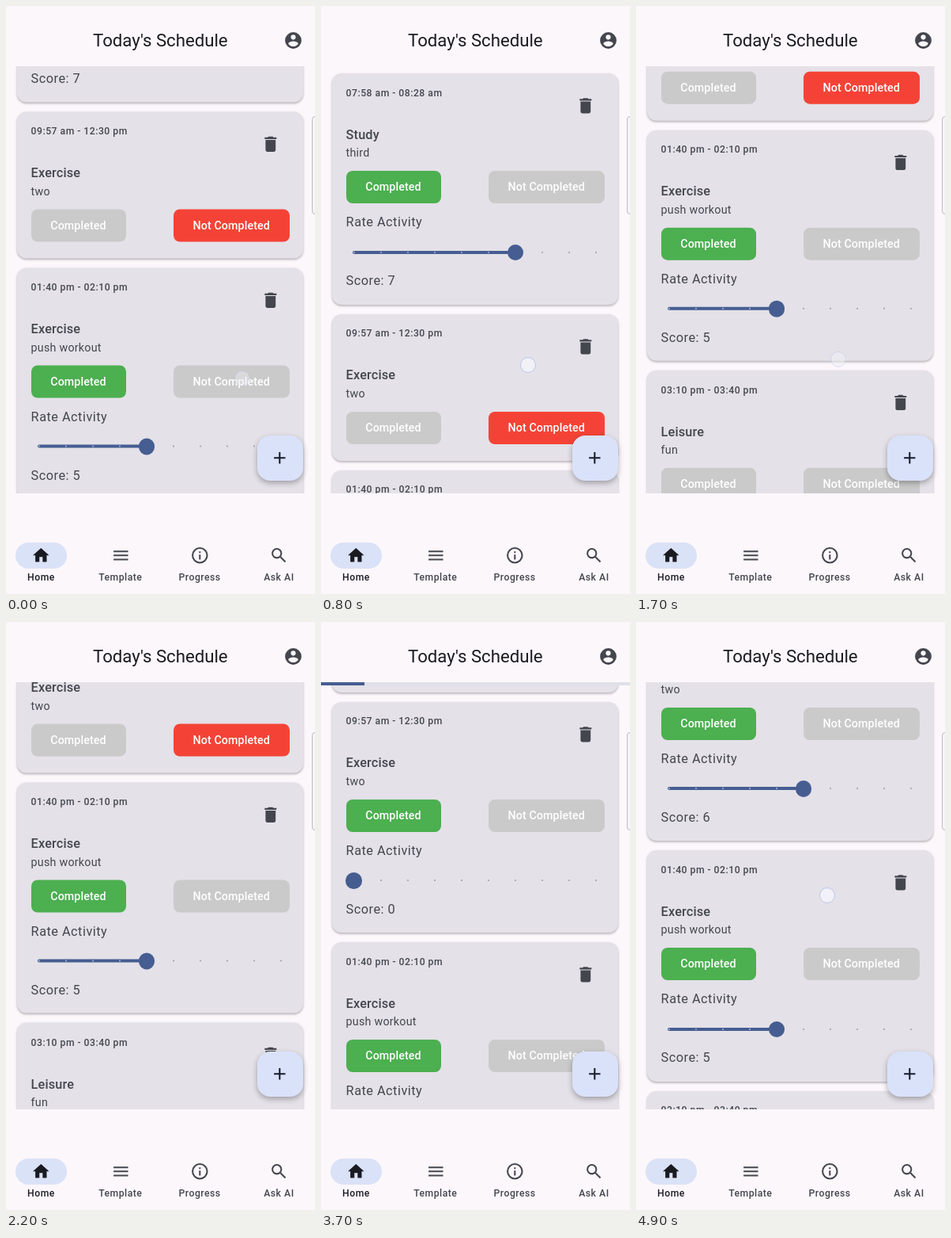
An HTML page for the animation above (5 s loop, 391x742 px).

```html
<!DOCTYPE html>
<html lang="en">
<head>
<meta charset="utf-8">
<title>Today's Schedule</title>
<style>
  html, body { margin: 0; width: 100%; height: 100%; overflow: hidden; background: #fcf7fb; }
  #app { position: relative; width: 391px; height: 742px; overflow: hidden; background: #fcf7fb;
    font-family: Roboto, "Noto Sans", sans-serif; color: #44464e; }
  #app div, #app svg { position: absolute; box-sizing: border-box; }
  .txt { white-space: nowrap; line-height: 20px; height: 20px; }
  .mid { transform: translateX(-50%); }
  .h1 { font-size: 22.2px; color: #1b1b20; }
  .time, .nav { font-size: 12.2px; font-weight: 500; letter-spacing: .5px; }
  .name { font-size: 16.3px; font-weight: 500; letter-spacing: .15px; }
  .note { font-size: 14.25px; letter-spacing: .25px; }
  .body { font-size: 16.3px; letter-spacing: .5px; }
  #list { left: 0; top: 76px; width: 391px; height: 538.5px; overflow: hidden; }
  #cards { left: 0; top: 9px; width: 391px; }
  .card { left: 14px; width: 362px; border-radius: 12px; background: #e4e1e8;
    box-shadow: 0 1.5px 3px rgba(0,0,0,.3); }
  .btn { top: 123px; height: 41px; border-radius: 8px; text-align: center; line-height: 41px;
    font-size: 14.25px; font-weight: 500; letter-spacing: .1px; white-space: nowrap; color: #fff; }
  .rate { left: 0; top: 0; }
  .bar { left: 25.5px; top: 223.9px; height: 4px; border-radius: 2px; background: #455d91; }
  .tick { top: 224.9px; width: 2px; height: 2px; border-radius: 1px; }
  .thumb { top: 215.6px; width: 20.6px; height: 20.6px; border-radius: 50%; background: #455d91; }
  #loader { left: 0; top: 76px; width: 391px; height: 4.2px; background: #e1e0e8; overflow: hidden; }
  #line { top: 0; height: 100%; background: #455d91; }
  #fab { left: 318px; top: 541.5px; width: 57.5px; height: 57.5px; border-radius: 16.3px;
    background: #dae2f9; box-shadow: 0 3px 7px rgba(0,0,0,.3); }
  #pill { left: 12px; top: 676.5px; width: 65px; height: 33px; border-radius: 17px; background: #dae2f7; }
  #edge { left: 387px; top: 138.5px; width: 12px; height: 124px; border-radius: 4px;
    border: 1px solid #bdbbc0; background: #f7f3f8; }
  #dot { left: -10px; top: -10px; width: 20px; height: 20px; border-radius: 50%;
    border: 1.5px solid #b9c7ee; background: #f1f1f7; }
</style>
</head>
<body>
<div id="app">
  <div id="list"><div id="cards"></div></div>
  <div id="loader"><div id="line"></div></div>
  <div id="fab"></div>
  <div id="pill"></div>
  <div id="edge"></div>
</div>
<script>
const $ = id => document.getElementById(id);
const app = $('app');

const stroke = d => `<path d="${d}" fill="none" stroke="currentColor" stroke-width="2"/>`;
const solid = d => `<path d="${d}" fill="currentColor"/>`;
const ring = (x, y, r) =>
  `<circle cx="${x}" cy="${y}" r="${r}" fill="none" stroke="currentColor" stroke-width="2"/>`;
const ICONS = {
  bin: solid('M6 7h12v12a2 2 0 0 1-2 2H8a2 2 0 0 1-2-2zM5 4h3.5l1-1h5l1 1H19v2H5z'),
  home: solid('M10 20v-6h4v6h5v-8h3L12 3 2 12h3v8z'),
  menu: stroke('M3 7h18M3 12h18M3 17h18'),
  info: ring(12, 12, 9) + stroke('M12 7v2M12 11v6'),
  find: ring(9.5, 9.5, 5.5) + stroke('M14 14l6 6'),
  plus: stroke('M12 5v14M5 12h14'),
  user: solid('M12 2a10 10 0 1 0 0 20a10 10 0 1 0 0-20zm0 3a3 3 0 1 1 0 6a3 3 0 1 1 0-6z' +
    'm0 14.2q-3.7 0-6-3.2c0-2 4-3.1 6-3.1s6 1.1 6 3.1q-2.3 3.2-6 3.2z')
};

function icon(parent, name, x, y, color = '#44464e', size = 24.6) {
  parent.insertAdjacentHTML('beforeend',
    `<svg viewBox="0 0 24 24" width="${size}" height="${size}"
      style="color:${color};left:${x - size / 2}px;top:${y - size / 2}px">${ICONS[name]}</svg>`);
}

function add(parent, cls, style = {}, text = '') {
  const el = document.createElement('div');
  el.className = cls;
  Object.assign(el.style, style);
  el.textContent = text;
  parent.append(el);
  return el;
}

// y is the vertical centre of the line
const label = (parent, cls, x, y, text) =>
  add(parent, 'txt ' + cls, { left: x + 'px', top: y - 10 + 'px' }, text);

const TALL = 291.5, SHORT = 185, GAP = 12, PAD = 17.6;
const tickX = i => 27.5 + 34.1 * i;
const scoreX = value => tickX(Math.max(value, 1) - 1);

function makeCard([time, name, note]) {
  const el = add($('cards'), 'card');
  label(el, 'time', PAD, 24.5, time);
  icon(el, 'bin', 320.3, 41, '#44464e', 25.6);
  label(el, 'name', PAD, 77.5, name);
  label(el, 'note', PAD, 100.3, note);
  const yes = add(el, 'btn', { left: '17.5px', width: '120px' }, 'Completed');
  const no = add(el, 'btn', { left: '198px', width: '146.5px' }, 'Not Completed');
  const rate = add(el, 'rate');
  label(rate, 'body', PAD, 188.3, 'Rate Activity');
  const bar = add(rate, 'bar');
  const ticks = Array.from({ length: 10 }, (_, i) =>
    add(rate, 'tick', { left: tickX(i) - 1 + 'px' }));
  const thumb = add(rate, 'thumb');
  const score = label(rate, 'body', PAD, 262.3, '');
  return { el, yes, no, rate, bar, ticks, thumb, score };
}

// Places a card and returns the top of the next one
function setCard(c, top, state, value) {
  const done = state === 'yes';
  const h = done ? TALL : SHORT;
  c.el.style.top = top + 'px';
  c.el.style.height = h + 'px';
  c.yes.style.background = done ? '#4caf50' : '#cacaca';
  c.no.style.background = state === 'no' ? '#f44336' : '#cacaca';
  c.rate.style.display = done ? '' : 'none';
  if (done) {
    const x = scoreX(value);
    c.bar.style.width = x - 25.5 + 'px';
    c.thumb.style.left = x - 10.3 + 'px';
    c.ticks.forEach((k, i) => k.style.background = tickX(i) < x ? '#a9b5d6' : '#9c9ba4');
    c.score.textContent = 'Score: ' + value;
  }
  return top + h + GAP;
}

const cards = [
  ['07:58 am - 08:28 am', 'Study', 'third'],
  ['09:57 am - 12:30 pm', 'Exercise', 'two'],
  ['01:40 pm - 02:10 pm', 'Exercise', 'push workout'],
  ['03:10 pm - 03:40 pm', 'Leisure', 'fun']
].map(makeCard);

label(app, 'h1 mid', 195.3, 43.3, "Today's Schedule");
icon(app, 'user', 363, 43.7, '#44464e', 25);
icon($('fab'), 'plus', 28.4, 28.6, '#171b2c');
['home Home', 'menu Template', 'info Progress', 'find Ask AI'].forEach((item, i) => {
  const [pic, ...words] = item.split(' ');
  const x = 44.5 + 100.3 * i;
  const color = i ? '#44464e' : '#1a1b21';
  icon(app, pic, x, 693, color);
  label(app, 'nav mid', x, 721, words.join(' ')).style.color = color;
});
const dot = add(app, '');
dot.id = 'dot';

const clamp = p => Math.min(1, Math.max(0, p));
const smooth = p => p * p * (3 - 2 * p);
const fling = p => 1 - (1 - p) ** 3;
const span = (t, start, end) => clamp((t - start) / (end - start));

// The finger rests at x, y when a swipe starts, and has left the glass at lift
const SWIPES = [
  { start: 0, end: 500, from: 255.5, to: 0, x: 299, y: 470, lift: 40, ease: fling },
  { start: 800, end: 1200, from: 0, to: 475.2, x: 262, y: 453, lift: 1100, ease: smooth },
  { start: 1400, end: 2000, from: 475.2, to: 383.5, x: 256, y: 400, lift: 1750, ease: smooth },
  { start: 2400, end: 2900, from: 383.5, to: 288, x: 259, y: 417, lift: 2840, ease: smooth },
  { start: 4600, end: 4900, from: 288, to: 404, x: 242, y: 461, lift: 5000, ease: smooth }
];
const TAP = 3200, OPEN = 3400, RATE = 3800, RATED = 4300;
const LOADS = [3500, 4300], LOAD_TIME = 600;

function finger(x, y, alpha) {
  dot.style.transform = `translate(${x}px, ${y}px)`;
  dot.style.opacity = alpha;
}

function draw(t) {
  const swipe = SWIPES.findLast(s => s.start <= t);
  const { start, end, from, to, ease } = swipe;
  const scroll = from + (to - from) * ease(span(t, start, end));
  $('cards').style.transform = `translateY(${-scroll}px)`;

  const score = Math.round(6 * smooth(span(t, RATE, RATED)));
  const states = [['yes', 7], t < OPEN ? ['no', 0] : ['yes', score], ['yes', 5], ['', 0]];
  let top = 0;
  cards.forEach((c, i) => top = setCard(c, top, ...states[i]));

  if (t >= TAP && t < OPEN) finger(91, 244, .9);
  else if (t >= RATE && t <= RATED) finger(14 + scoreX(score), 326, .8);
  else finger(swipe.x, swipe.y + from - scroll, clamp((swipe.lift - t) / 100));

  const age = t - LOADS.findLast(s => s <= t);
  $('loader').style.display = age < LOAD_TIME ? '' : 'none';
  const head = 391 * smooth(span(age, 0, 850)), tail = 391 * smooth(span(age, 330, 1180));
  $('line').style.left = tail + 'px';
  $('line').style.width = head - tail + 'px';
}

let last = -1;
function tick() {
  const t = Math.floor(performance.now() % 5000 / 100) * 100;
  if (t !== last) draw(last = t);
  requestAnimationFrame(tick);
}
tick();
</script>
</body>
</html>
```
